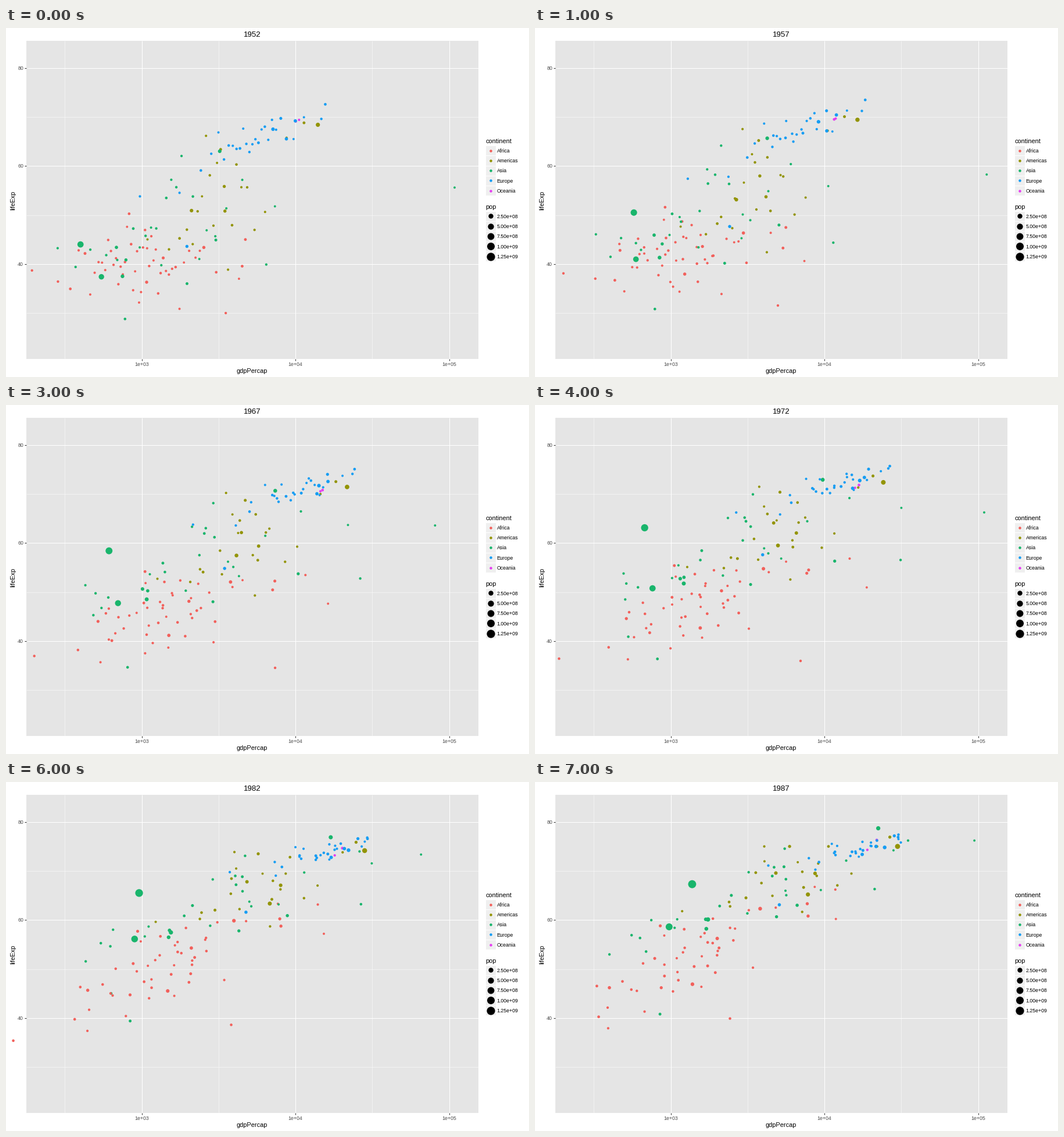
These frames come from a looping animation (900 px wide and 600 px high, 8 s). A matplotlib script:

```python
import numpy as np
import matplotlib.pyplot as plt
from matplotlib.animation import FuncAnimation
from matplotlib.patches import Rectangle

plt.rcParams["font.family"] = ["Liberation Sans", "DejaVu Sans"]
PX = 0.72  # points per pixel at 100 dpi
STEPS = 8
COLORS = {"Africa": "#f2605b", "Americas": "#939405", "Asia": "#19b56c",
          "Europe": "#169df3", "Oceania": "#e53ff0"}
GROWTH = {"Africa": 1.026, "Americas": 1.02, "Asia": 1.021,
          "Europe": 1.007, "Oceania": 1.015}
# Early life gain and income bump in mid-period
LEAD = {"Africa": 0.03, "Americas": 0.03, "Asia": 0.06, "Europe": 0.15, "Oceania": -0.2}
BOOM = {"Africa": 0.1, "Americas": 0.05, "Asia": 0, "Europe": 0.07, "Oceania": 0.03}
OIL_BOOM = 0.4

# Standout dots: income and life at the start, the same at the end, millions of people
STANDOUTS = {
    "Oceania": [(10040, 69.1, 21889, 76.3, 13), (10557, 69.4, 19007, 74.3, 2.9)],
    "Africa": [(4725, 45, 7826, 60.8, 24), (1077, 36.3, 1385, 46.9, 54)],
    "Americas": [(13990, 68.4, 29884, 75, 210), (11367, 68.8, 26627, 76.9, 22),
                 (2109, 50.9, 7807, 65.2, 101), (3478, 50.8, 8688, 69.5, 56)],
    "Asia": [(547, 37.4, 977, 58.6, 567), (750, 37.5, 1748, 60.1, 121),
             (3217, 63, 22376, 78.7, 107), (685, 43.4, 1705, 58.2, 69),
             (779, 28.8, 852, 40.8, 13)],
    "Europe": [(1969, 43.6, 5089, 63.1, 37), (7144, 67.5, 24640, 74.8, 78),
               (14734, 69.6, 30281, 77.4, 6), (9980, 69.2, 21665, 75, 56),
               (974, 53.8, 4314, 71.1, 4)]}
OIL = {"Africa": [(2388, 42.7, 11771, 66.2, 2), (4293, 37, 11864, 60.2, 0.5),
                  (3521, 30, 2430, 39.9, 6)],
       "Asia": [(6460, 39.9, 21198, 66.3, 6), (3035, 44.9, 6643, 63, 30)]}

# Erratic paths
GIANT_INCOME = (400, 576, 488, 613, 677, 741, 962, 1379)
GIANT_LIFE = (44, 50.5, 44.5, 58.4, 63.1, 64, 65.5, 67.3)
RICHEST_INCOME = (108382, 113523, 95458, 80895, 109348, 59265, 31354, 28118)


def to_x(log_income):
    return 233.5 + 264.6 * (log_income - 3)


def to_y(life):
    return 237.2 - 8.43 * (life - 60)


def area(millions):
    """Marker area in square points for a population."""
    return ((3.7 + 10.7 * np.sqrt(np.asarray(millions) / 1319)) * PX) ** 2


def crowd(seed, n, income, gain, life0, life1, low, high):
    """Seeded dots; life follows income as (mean, slope, spread) at both ends."""
    rng = np.random.default_rng(seed)

    def bell():
        u = (np.arange(n) + 0.5) / n
        return rng.permutation(0.58 * np.log(u / (1 - u)))

    mean, spread = income
    z = bell()
    start = mean + spread * z
    end = start + gain[0] + gain[1] * z + gain[2] * bell()
    luck = bell()

    def lives(logs, rule, center):
        base, slope, noise = rule
        return np.clip(base + slope * (logs - center) + noise * luck, low, high)

    first = lives(start, life0, mean)
    last = lives(end, life1, mean + gain[0])
    pop = np.clip(np.exp(1.6 + 1.05 * bell()), 0.2, 60)
    return np.column_stack([10 ** start, first, 10 ** end, last, pop])


CROWDS = {
    "Africa": crowd(3, 47, (2.97, 0.26), (0.13, 0.05, 0.18),
                    (40, 5, 4), (52, 19, 3.8), 30, 72),
    "Americas": crowd(8, 21, (3.49, 0.21), (0.26, 0, 0.15),
                      (52.5, 20, 7), (69, 12, 4), 37.6, 75),
    "Asia": crowd(5, 23, (3.16, 0.32), (0.38, 0.09, 0.24),
                  (47.5, 13, 6), (65.5, 12, 3), 32, 76.2),
    "Europe": crowd(2, 25, (3.72, 0.21), (0.49, -0.04, 0.09),
                    (65.2, 13, 2), (74.4, 7, 1), 54, 77.4)}

GROUPS = []
for name, rows in STANDOUTS.items():
    if name in OIL:
        GROUPS.append((name, OIL[name], OIL_BOOM))
    if name in CROWDS:
        GROUPS.append((name, CROWDS[name], BOOM[name]))
    GROUPS.append((name, rows, BOOM[name]))


def wanderers(step):
    """Log income, life and population of three irregular dots."""
    p = step / (STEPS - 1)
    dip = 18.5 * np.exp(-(step - 5) ** 2)
    return np.array([
        (np.log10(GIANT_INCOME[step]), GIANT_LIFE[step], 862),
        (np.log10(RICHEST_INCOME[step]), 55.6 + 18.6 * p, 0.8),
        (2.57 + 0.27 * p, 39.4 + 14.5 * p - dip, 7)])


def state(step):
    """Positions and marker areas of all dots at one step."""
    p = step / (STEPS - 1)
    arc = np.sin(np.pi * p)
    years = 5 * (step - 4)
    income, life, pop = wanderers(step).T
    spots = [np.column_stack([to_x(income), to_y(life)])]
    areas = [area(pop * GROWTH["Asia"] ** years)]
    for name, rows, boom in GROUPS:
        g0, l0, g1, l1, pop = np.array(rows, float).T
        income = np.log10(g0) + np.log10(g1 / g0) * p + boom * arc
        life = l0 + (l1 - l0) * (p + LEAD[name] * arc)
        spots.append(np.column_stack([to_x(income), to_y(life)]))
        areas.append(area(pop * GROWTH[name] ** years))
    return np.vstack(spots), np.concatenate(areas)


fig = plt.figure(figsize=(9, 6), dpi=100, facecolor="white")
ax = fig.add_axes([0, 0, 1, 1])
ax.set(xlim=(0, 900), ylim=(600, 0))
ax.axis("off")


def label(x, y, text, size, color="black", ha="left", **kw):
    return ax.text(x, y, text, fontsize=size * PX, color=color, ha=ha, **kw)


def line(xs, ys, color, width):
    ax.plot(xs, ys, color=color, lw=width * PX, zorder=2, solid_capstyle="butt")


LEFT, RIGHT, TOP, BOTTOM = 35, 813, 22, 569
GREY = "#4d4d4d"
ax.add_patch(Rectangle((LEFT, TOP), RIGHT - LEFT, BOTTOM - TOP, fc="#e5e5e5", lw=0))
for power in (2.5, 3.5, 4.5):
    line([to_x(power)] * 2, [TOP, BOTTOM], "white", 0.53)
for life in (30, 50, 70):
    line([LEFT, RIGHT], [to_y(life)] * 2, "white", 0.53)
for power in (3, 4, 5):
    x = to_x(power)
    line([x, x], [TOP, BOTTOM], "white", 1.07)
    line([x, x], [BOTTOM, BOTTOM + 2.7], "#333333", 1.07)
    label(x, 581, f"1e+0{power}", 8.8, GREY, "center")
for life in (40, 60, 80):
    y = to_y(life)
    line([LEFT, RIGHT], [y, y], "white", 1.07)
    line([LEFT - 2.7, LEFT], [y, y], "#333333", 1.07)
    label(30, y + 3.2, str(life), 8.8, GREY, "right")
label(423.5, 593, "gdpPercap", 11, ha="center")
label(12, 296, "lifeExp", 11, ha="center", va="center", rotation=90)


def legend(title, top, names, colors, areas):
    label(825, top, title, 11)
    for i, name in enumerate(names):
        y = top + 12.4 + 17.28 * i
        ax.add_patch(Rectangle((825.4, y - 8.64), 17.28, 17.28,
                               fc="#efefef", ec="white", lw=PX))
        ax.scatter(834, y, s=areas[i], c=colors[i], lw=0, zorder=3)
        label(844.5, y + 3.3, name, 8.8)


legend("continent", 198.2, COLORS, list(COLORS.values()), [area(8)] * 5)
sizes = [250, 500, 750, 1000, 1250]
legend("pop", 311, [f"{s * 1e6:.2e}" for s in sizes], ["black"] * 5, area(sizes))

title = label(423.5, 15.2, "", 13.2, ha="center")
tints = [COLORS["Asia"]] * 3
for name, rows, _ in GROUPS:
    tints += [COLORS[name]] * len(rows)
spots, areas = state(0)
dots = ax.scatter(*spots.T, s=areas, c=tints, lw=0, zorder=4)


def draw(step):
    spots, areas = state(step)
    dots.set_offsets(spots)
    dots.set_sizes(areas)
    title.set_text(str(1952 + 5 * step))
    return dots, title


anim = FuncAnimation(fig, draw, frames=STEPS, init_func=lambda: draw(0),
                     interval=1000, repeat=True, repeat_delay=0)
plt.show()
```
